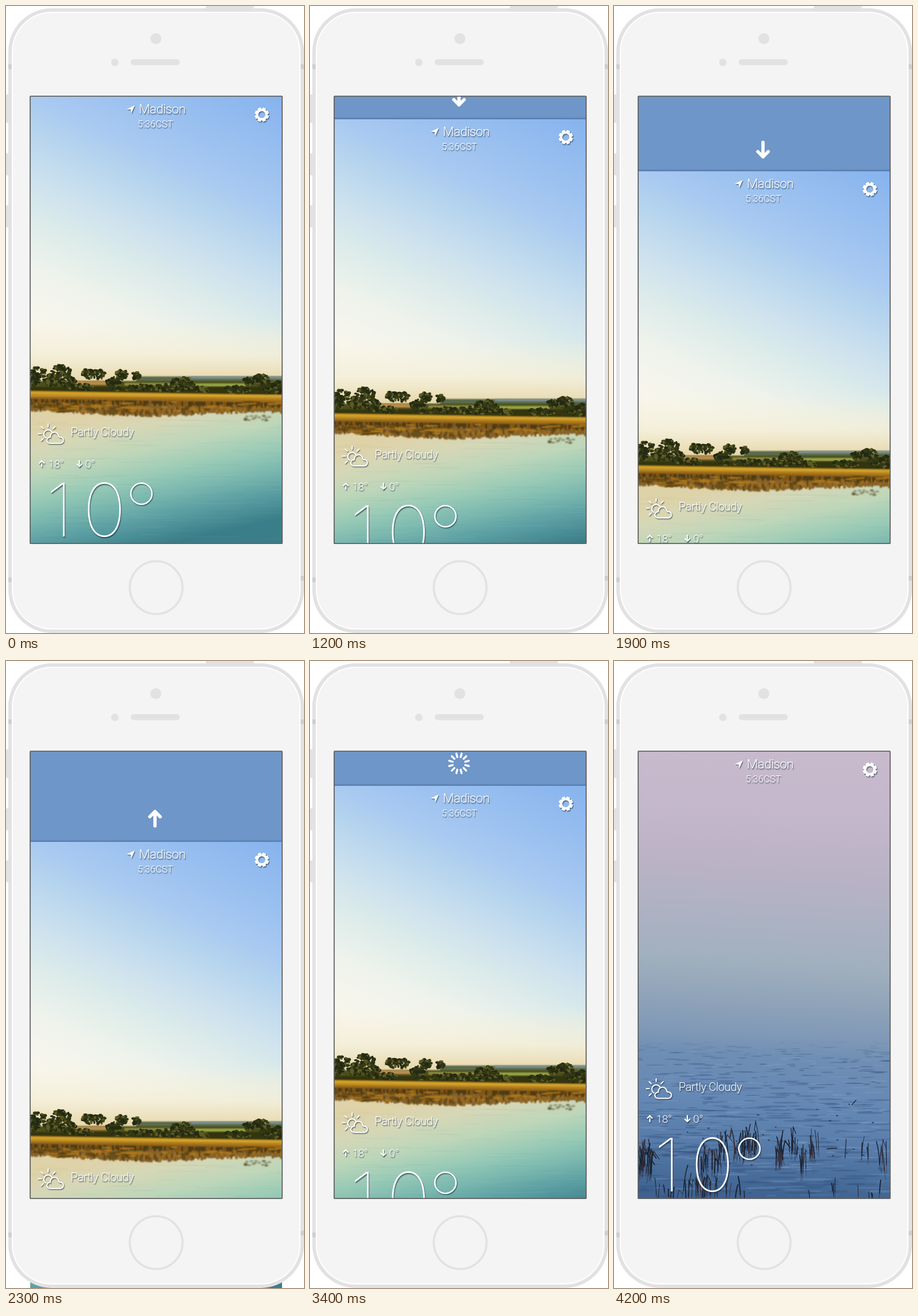
Recreate the animation shown at these times as an HTML page with a canvas. Size 516x1085 px, loop 8.2 s.

```html
<!DOCTYPE html>
<html lang="en">
<head>
<meta charset="utf-8">
<title>Pull to refresh</title>
<style>
html, body { margin: 0; width: 100%; height: 100%; overflow: hidden; background: #fff; }
canvas { display: block; }
</style>
</head>
<body>
<canvas id="stage" width="516" height="1085"></canvas>
<script>
const W = 516, H = 1085, LOOP = 8200, STEP = 100;
const SCREEN = { x: 42, y: 157, w: 436, h: 773 };
const GREY = '#e2e2e2';
const ctx = document.getElementById('stage').getContext('2d');

function seeded(seed) {
  return () => {
    seed = (seed * 1664525 + 1013904223) >>> 0;
    return seed / 4294967296;
  };
}

// Piecewise linear value through [step, value] keys
function track(keys, n) {
  if (n <= keys[0][0]) return keys[0][1];
  for (let i = 1; i < keys.length; i++) {
    const [a, u] = keys[i - 1], [b, v] = keys[i];
    if (n <= b) return u + (v - u) * (n - a) / (b - a);
  }
  return keys[keys.length - 1][1];
}

function gradient(c, x0, y0, x1, y1, stops) {
  const g = c.createLinearGradient(x0, y0, x1, y1);
  stops.forEach(([p, color]) => g.addColorStop(p, color));
  return g;
}

function rect(c, x, y, w, h, fill) {
  c.fillStyle = fill;
  c.fillRect(x, y, w, h);
}

function disc(c, x, y, rx, ry, fill) {
  c.fillStyle = fill;
  c.beginPath();
  c.ellipse(x, y, rx, ry, 0, 0, Math.PI * 2);
  c.fill();
}

function line(c, ...pts) {
  c.beginPath();
  for (let i = 0; i < pts.length; i += 2) c.lineTo(pts[i], pts[i + 1]);
  c.stroke();
}

function layer(paint) {
  const cv = document.createElement('canvas');
  cv.width = W;
  cv.height = H;
  const c = cv.getContext('2d');
  c.beginPath();
  c.rect(SCREEN.x, SCREEN.y, SCREEN.w, SCREEN.h + 1);
  c.clip();
  paint(c);
  return cv;
}

// Leafy clump made of small dabs, lighter toward the upper left
function bush(c, rnd, x, y, rx, ry) {
  const count = Math.round(rx * ry / 3) + 14;
  for (let i = 0; i < count; i++) {
    const a = rnd() * Math.PI * 2, d = Math.sqrt(rnd());
    const lit = rnd() < 0.22;
    disc(c, x + Math.cos(a) * d * rx, y + Math.sin(a) * d * ry,
      1.5 + rnd() * 2.5, 1.2 + rnd() * 2, lit ? '#5d5c22' : rnd() < 0.5 ? '#242a12' : '#333815');
  }
}

const day = layer(c => {
  const rnd = seeded(11);
  rect(c, 42, 157, 436, 500, gradient(c, 478, 157, 255, 638, [
    [0, '#86b3ee'], [0.34, '#a8c9f1'], [0.43, '#b4d3ee'], [0.59, '#cee2ee'],
    [0.7, '#dcebea'], [0.85, '#eff3ec'], [1, '#f8f6ec']]));
  rect(c, 42, 540, 436, 110, gradient(c, 0, 540, 0, 645, [
    [0, 'rgba(245,240,216,0)'], [0.6, 'rgba(243,237,212,.75)'], [1, '#e8d9ae']]));

  rect(c, 42, 690, 436, 242, gradient(c, 225, 695, 275, 930, [
    [0, '#ded2a8'], [0.14, '#d6d7b6'], [0.32, '#bdd6b9'], [0.5, '#98cab6'],
    [0.66, '#78b6ae'], [0.8, '#5c9fa3'], [1, '#3a7e89']]));
  for (let i = 0; i < 170; i++) {
    const y = 712 + rnd() * 215;
    rect(c, 42 + rnd() * 436, y, 20 + rnd() * 80, 1,
      rnd() < 0.5 ? 'rgba(255,255,255,.05)' : 'rgba(40,110,115,.06)');
  }

  c.filter = 'blur(1px)';
  rect(c, 225, 641, 255, 13, '#5b6b4d');
  rect(c, 320, 641, 160, 4, '#7f9292');
  rect(c, 42, 649, 436, 24, '#4b4f1c');
  rect(c, 118, 649, 62, 7, '#b98c4c');
  rect(c, 205, 652, 80, 5, '#8f8a3e');
  rect(c, 325, 653, 90, 6, '#94a343');
  rect(c, 42, 659, 436, 14, '#34350f');
  c.filter = 'blur(.7px)';
  for (const [x, y, rx, ry] of [
    [56, 635, 13, 10], [50, 648, 10, 9], [95, 636, 17, 15], [80, 647, 14, 10], [108, 651, 12, 9],
    [141, 637, 9, 9], [161, 637, 11, 8], [200, 638, 11, 8], [225, 640, 7, 7], [187, 654, 14, 13],
    [305, 656, 20, 14], [276, 661, 20, 7], [338, 663, 12, 6], [420, 648, 9, 8], [441, 646, 14, 8],
    [455, 660, 15, 12], [400, 664, 24, 7], [470, 660, 9, 11], [130, 660, 22, 7], [232, 661, 24, 6]
  ]) bush(c, rnd, x, y, rx, ry);

  // Lit bank with its ragged reflection
  c.filter = 'blur(1.3px)';
  for (let x = 40; x < 480; x += 3) {
    const tilt = (x - 42) / 436 * 7;
    const low = 697 + 8 * Math.sin((x - 30) / 130) ** 2 + tilt * 0.5 + rnd() * 5;
    rect(c, x, 676, 4, low - 676, '#805a20');
    rect(c, x, low - 7 - rnd() * 10, 4, 4 + rnd() * 5, rnd() < 0.5 ? '#5a4618' : '#a4711f');
    rect(c, x, 680 + tilt, 4, 4 + rnd() * 5, rnd() < 0.6 ? '#3f3210' : '#83530c');
    rect(c, x, 666 + tilt, 4, 10, '#c4901c');
    rect(c, x, 668 + tilt, 4, 3, '#dfad36');
    rect(c, x, 675 + tilt, 4, 3, '#a86f10');
  }
  for (let i = 0; i < 70; i++) {
    disc(c, 42 + rnd() * 436, 685 + rnd() * 17, 4 + rnd() * 9, 1.5, rnd() < 0.5 ? '#b07a1c' : '#59410f');
  }
  for (let i = 0; i < 18; i++) {
    disc(c, 410 + rnd() * 48, 709 + rnd() * 8, 3, 1.6, 'rgba(88,82,45,.55)');
  }
  disc(c, 184, 702, 10, 5, '#67501d');
  c.filter = 'none';
});

const dusk = layer(c => {
  const rnd = seeded(29);
  rect(c, 42, 157, 436, 774, gradient(c, 285, 157, 245, 931, [
    [0, '#c8bacd'], [0.14, '#c4b7cb'], [0.27, '#b9b2c5'], [0.36, '#aeb2c3'], [0.47, '#a1b0be'],
    [0.56, '#8fa3b9'], [0.63, '#8099b7'], [0.68, '#6f8eb4'], [0.78, '#6588b4'],
    [0.88, '#587ca9'], [1, '#3e628f']]));

  for (let i = 0; i < 620; i++) {
    const d = rnd() ** 1.3, y = 660 + d * 268;
    const w = 4 + rnd() * (10 + 30 * d), h = 0.5 + rnd() * (0.7 + d * 1.2);
    const fade = Math.min(1, (y - 652) / 40);
    disc(c, 42 + rnd() * 436, y, w, h, rnd() < 0.62
      ? `rgba(48,78,120,${0.34 * fade})` : `rgba(142,172,210,${0.24 * fade})`);
  }

  c.lineCap = 'round';
  const reed = (x, y, tall) => {
    const lean = (rnd() - 0.5) * tall * 0.35;
    c.strokeStyle = rnd() < 0.75 ? '#192333' : '#3a3440';
    c.lineWidth = 0.8 + rnd() * 1.3;
    c.beginPath();
    c.moveTo(x, y);
    c.quadraticCurveTo(x + lean * 0.2, y - tall * 0.6, x + lean, y - tall);
    if (rnd() < 0.25) c.lineTo(x + lean * 2 + 4, y - tall * 0.65);
    c.stroke();
    c.globalAlpha = 0.35;
    line(c, x, y, x - lean * 0.5, y + tall * 0.35);
    c.globalAlpha = 1;
  };
  // Clump: centre, spread, base, height, stems
  for (const [x, s, y, tall, count] of [
    [55, 12, 880, 50, 24], [140, 20, 922, 42, 15], [165, 22, 880, 42, 15], [205, 22, 856, 38, 19],
    [238, 15, 850, 40, 13], [284, 9, 866, 42, 14], [310, 7, 846, 30, 9], [328, 6, 878, 40, 7],
    [347, 9, 852, 30, 9], [195, 40, 926, 34, 12], [435, 7, 858, 28, 4], [465, 7, 878, 48, 5],
    [395, 80, 925, 28, 8], [90, 25, 925, 26, 7]
  ]) for (let i = 0; i < count; i++) {
    reed(x + (rnd() - 0.5) * 2 * s, y + (rnd() - 0.5) * 18, tall * (0.45 + rnd() * 0.7));
  }
  for (let i = 0; i < 26; i++) {
    disc(c, 120 + rnd() * 350, 765 + rnd() * 130, 1.2 + rnd(), 1, '#27374f');
  }
  c.strokeStyle = '#202b3c';
  c.lineWidth = 1.3;
  line(c, 369, 844, 386, 843);
  line(c, 412, 768, 419, 760);
  line(c, 400, 860, 402, 828);
});

// Text placed by the left edge of its ink
function label(str, x, y, font, spacing = 0) {
  ctx.font = font + ' Roboto, "Liberation Sans", sans-serif';
  ctx.letterSpacing = spacing + 'px';
  ctx.fillText(str, x + ctx.measureText(str).actualBoundingBoxLeft, y);
}

function arrow(x, y, half, wing, width) {
  ctx.lineWidth = width;
  line(ctx, x, y + half, x, y - half);
  line(ctx, x - wing, y - half + wing, x, y - half, x + wing, y - half + wing);
}

function gear(x, y) {
  ctx.beginPath();
  for (let i = 0; i < 8; i++) {
    const a = i * Math.PI / 4 + Math.PI / 8;
    for (const [da, r] of [[-0.36, 9.8], [-0.21, 12.6], [0.21, 12.6], [0.36, 9.8]]) {
      ctx.lineTo(x + r * Math.cos(a + da), y + r * Math.sin(a + da));
    }
  }
  ctx.closePath();
  ctx.moveTo(x + 6, y);
  ctx.arc(x, y, 6, 0, Math.PI * 2);
  ctx.fill('evenodd');
}

function weatherIcon() {
  ctx.lineWidth = 2;
  for (const a of [90, 135, 180, 225, 270, 315]) {
    const u = Math.cos(a * Math.PI / 180), v = Math.sin(a * Math.PI / 180);
    if (a !== 90) line(ctx, 73 + u * 12, 740 + v * 12, 73 + u * 17, 740 + v * 17);
  }
  ctx.beginPath();
  ctx.arc(73, 741, 7.5, 2.1, -0.45);
  ctx.stroke();
  ctx.beginPath();
  ctx.arc(76, 751.5, 5.2, Math.PI / 2, -1.45);
  ctx.arc(84, 745, 7.4, 3.0, -0.1);
  ctx.arc(94, 751.3, 5.4, -1.75, Math.PI / 2);
  ctx.closePath();
  ctx.stroke();
}

function drawInfo(alpha) {
  if (alpha <= 0) return;
  ctx.save();
  ctx.globalAlpha = alpha;
  ctx.fillStyle = ctx.strokeStyle = '#fff';
  ctx.shadowColor = 'rgba(20,40,60,.65)';
  ctx.shadowBlur = 1.5;
  ctx.shadowOffsetX = 1;
  ctx.shadowOffsetY = 1.5;
  ctx.lineCap = 'round';
  ctx.lineJoin = 'round';

  label('Madison', 232, 186, '300 22.5px', -0.7);
  label('5:36CST', 229, 210, '300 16.5px');
  label('Partly Cloudy', 113, 744, '300 20px', -0.5);
  label('18°', 74, 799, '300 19px', -0.4);
  label('0°', 138, 799, '300 19px', -0.4);

  ctx.beginPath();
  for (const [x, y] of [[223, 172], [209, 178.5], [216, 179.3], [217, 186]]) ctx.lineTo(x, y);
  ctx.fill();
  gear(443, 188);
  weatherIcon();
  arrow(62, 792, 5, 4, 2.3);
  arrow(127, 792, -5, -4, 2.3);

  ctx.font = '100 128px Inter, Roboto, sans-serif';
  ctx.letterSpacing = '0px';
  ctx.fillText('1', 102 - ctx.measureText('1').actualBoundingBoxRight, 918);
  const zero = ctx.measureText('0');
  ctx.fillText('0', 170.5 + (zero.actualBoundingBoxLeft - zero.actualBoundingBoxRight) / 2, 918);
  ctx.lineWidth = 2.6;
  ctx.beginPath();
  ctx.arc(234.5, 844, 18.3, 0, Math.PI * 2);
  ctx.stroke();
  ctx.restore();
}

function drawPull(n, offset) {
  rect(ctx, SCREEN.x, SCREEN.y, SCREEN.w, SCREEN.h, '#6e96c8');
  ctx.save();
  ctx.translate(258, SCREEN.y + offset - 38.8);
  ctx.strokeStyle = '#fff';
  ctx.lineCap = 'round';
  ctx.lineJoin = 'round';
  if (n < 24) {
    ctx.rotate(Math.PI * track([[19, 0], [22, 1]], n));
    arrow(0, 1.2, -12.5, -9, 5.6);
  } else {
    ctx.rotate((n - 34) * Math.PI / 12 + Math.PI / 12);
    ctx.lineWidth = 3.4;
    for (let i = 0; i < 12; i++) {
      line(ctx, 0, -11.2, 0, -17.6);
      ctx.rotate(Math.PI / 6);
    }
  }
  ctx.restore();
  const top = SCREEN.y + offset;
  rect(ctx, SCREEN.x, top - 4, SCREEN.w, 4,
    gradient(ctx, 0, top - 4, 0, top, [[0, 'rgba(45,70,120,0)'], [1, 'rgba(45,70,120,.4)']]));
}

function drawPhone() {
  const { x, y, w, h } = SCREEN;
  rect(ctx, 346, 0, 83, 5, GREY);
  for (const [by, bh] of [[153, 49], [255, 38], [345, 38]]) rect(ctx, 0, by, 5, bh, GREY);

  const shell = (inset, fill) => {
    ctx.beginPath();
    ctx.roundRect(4 + inset, 4 + inset, 512 - inset * 2, 1081 - inset * 2, 75 - inset);
    ctx.rect(x, y, w, h);
    ctx.fillStyle = fill;
    ctx.fill('evenodd');
  };
  shell(0, GREY);
  for (const [bx, by] of [[4, 101], [510, 101], [4, 989], [510, 986]]) rect(ctx, bx, by, 6, 8, '#ccd0d1');
  shell(6, '#fff');
  shell(8, '#f4f4f4');

  disc(ctx, 259.5, 56.5, 9.5, 9.5, GREY);
  disc(ctx, 188.5, 97.5, 6.5, 6.5, GREY);
  ctx.beginPath();
  ctx.roundRect(216, 92, 85, 10.5, 5.2);
  ctx.fill();
  ctx.strokeStyle = GREY;
  ctx.lineWidth = 3.5;
  ctx.beginPath();
  ctx.arc(260, 1006.5, 45.7, 0, Math.PI * 2);
  ctx.stroke();

  ctx.strokeStyle = '#626262';
  ctx.lineWidth = 1.8;
  ctx.beginPath();
  ctx.roundRect(x - 0.2, y - 0.8, w + 0.4, h + 1, 1);
  ctx.stroke();
}

function draw(ms) {
  const n = Math.floor(ms % LOOP / STEP);
  const offset = Math.round(track(
    [[9, 0], [21.1, 156], [23, 156], [27, 117], [32, 117], [36, 0]], n));
  const fade = track([[37, 0], [42, 1]], n);

  rect(ctx, 0, 0, W, H, '#fff');
  if (offset) drawPull(n, offset);
  ctx.save();
  ctx.translate(0, offset);
  ctx.drawImage(day, 0, 0);
  ctx.globalAlpha = fade;
  ctx.drawImage(dusk, 0, 0);
  drawInfo(1 - fade);
  drawInfo(fade);
  ctx.restore();
  drawPhone();
}

const start = performance.now();
function tick() {
  draw(performance.now() - start);
  requestAnimationFrame(tick);
}
tick();
</script>
</body>
</html>
```
